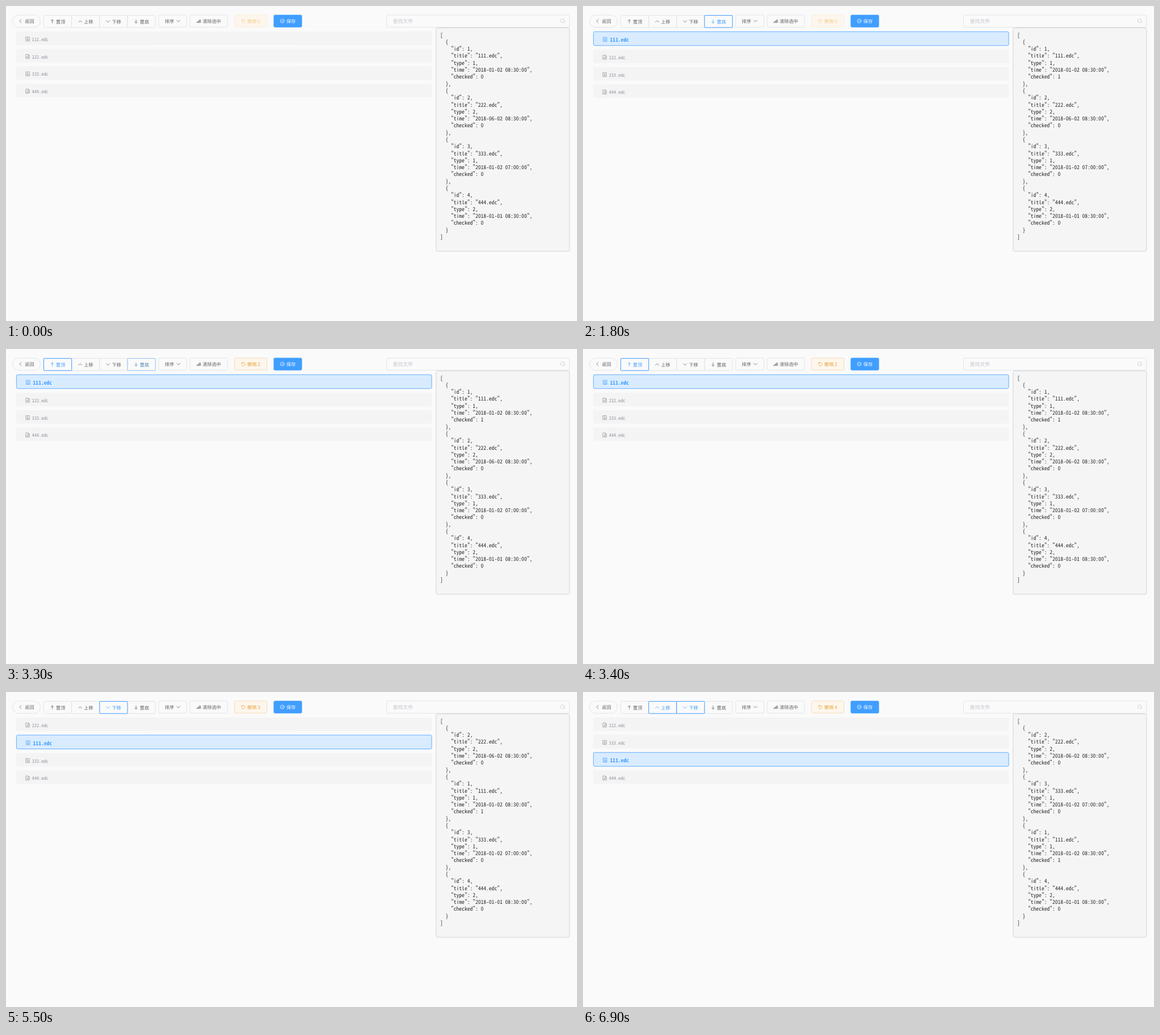
These frames come from a looping animation (1006 px wide and 556 px high, 8000 ms). An HTML page:

```html
<!DOCTYPE html>
<html lang="zh">
<head>
<meta charset="utf-8">
<title>文件排序</title>
<style>
  html, body { margin: 0; width: 100%; height: 100%; overflow: hidden; background: #fafafa; }
  svg { display: block; }
  text { font: 8.2px "Noto Sans CJK SC", "Noto Sans CJK", sans-serif; fill: currentColor; text-rendering: geometricPrecision; white-space: pre; }
  .icon { fill: none; stroke: currentColor; stroke-width: .75; stroke-linecap: round; stroke-linejoin: round; }
  .frame { stroke-width: .8; }
  .btn { color: #606266; }
  .btn .frame { fill: #fafafa; stroke: #dcdfe6; }
  .hot { color: #409eff; }
  .hot .frame { stroke: #409eff; stroke-width: 1; }
  .warn { color: #e6a23c; }
  .warn .frame { fill: #fdf6ec; stroke: #f5dab1; }
  .warn.off { color: #f3cc90; }
  .warn.off .frame { stroke: #faecd8; }
  .primary { color: #fff; }
  .primary .frame { fill: #409eff; stroke: #409eff; }
  .search { color: #c0c4cc; }
  .search text { font-size: 8.9px; }
  .row { color: #909399; }
  .row .frame { fill: #f4f4f5; }
  .row.on { color: #409eff; }
  .row.on .frame { fill: #d9ecff; stroke: #409eff; }
  .row text, #json text { font-family: "Noto Sans Mono CJK SC", "Noto Sans Mono CJK JP", "Noto Sans Mono", monospace; }
  .row.on text { font-size: 9.56px; font-weight: bold; }
  #json { color: #2a2a2a; }
  #json text { font-size: 9.56px; }
</style>
</head>
<body>
<svg width="1006" height="556" viewBox="0 0 1006 556">
  <g id="bar"></g>
  <g id="hot"></g>
  <g id="undo"></g>
  <g id="rows"></g>
  <rect x="757.8" y="38.6" width="235" height="394.3" rx="2.5" fill="#f5f5f5" stroke="#ccc" stroke-width=".8"/>
  <g id="json"></g>
</svg>
<script>
const LOOP = 8000;
const $ = id => document.getElementById(id);

// Icons are drawn around their own centre
const icons = {
  left: 'M1.6-3L-1.6 0L1.6 3',
  up: 'M-3 1.5L0-1.5L3 1.5',
  down: 'M-3-1.5L0 1.5L3-1.5',
  arrowUp: 'M0 3V-3M-2.4-.8L0-3L2.4-.8',
  arrowDown: 'M0-3V3M-2.4 .8L0 3L2.4 .8',
  brush: 'M-3.6 2.4H3.4V-.4L-.2 .2L-3.6 2.4M-.6 0L2-2.8L3.2-1.8L1.6 0M-.6 2.2L.4 .8M1.4 2.2V1',
  undo: 'M-2.8-2.8V-1H-1M-2.6-1.2A3 3 0 1 1-2.7 1.4',
  check: 'M3.4 0A3.4 3.4 0 1 1-3.4 0A3.4 3.4 0 1 1 3.4 0M-1.7 0L-.4 1.3L1.8-1.2',
  search: 'M3 0A3.3 3.3 0 1 1-3.6 0A3.3 3.3 0 1 1 3 0M2 2.4L3.6 4',
  tickets: 'M-3-3.6H3V3.6H-3ZM-1.5-1.6H.2M-1.5 .2H1.5M-1.5 1.9H1.5',
  doc: 'M-3-3.6H1L3-1.6V3.6H-3ZM1-3.6V-1.6H3M-1.5 .2H1.5M-1.5 1.9H1.5'
};

const icon = (name, x, y) => `<path class="icon" transform="translate(${x} ${y})" d="${icons[name]}"/>`;
const label = (s, x, y) => `<text x="${x}" y="${y}">${s}</text>`;
const frame = (x, y, w, h, r) => `<rect class="frame" x="${x}" y="${y}" width="${w}" height="${h}" rx="${r}"/>`;
const group = (cls, body, alpha = 1) => `<g class="${cls}" opacity="${alpha}">${body}</g>`;

const moves = [['置顶', 'arrowUp'], ['上移', 'up'], ['下移', 'down'], ['置底', 'arrowDown']];
const TOP = 0, UP = 1, DOWN = 2, BOTTOM = 3;

function moveButton(i, hot, alpha) {
  const [name, glyph] = moves[i], x = 66.5 + i * 49.2;
  const r = !hot && (i === TOP || i === BOTTOM) ? 2 : 0.5;
  const body = frame(x, 16.6, 49.2, 21.4, r) + icon(glyph, x + 15, 27.2) + label(name, x + 21.6, 30.6);
  return group(hot ? 'btn hot' : 'btn', body, alpha);
}

$('bar').innerHTML =
  group('btn', frame(11.6, 16, 48.9, 21.6, 10.8) + icon('left', 25.4, 26.6) + label('返回', 33.2, 30)) +
  moves.map((_, i) => moveButton(i)).join('') +
  group('btn', frame(269, 15.9, 49.6, 21.4, 2) + label('排序', 279.8, 29.8) + icon('down', 303.8, 26.6)) +
  group('btn', frame(324.2, 15.9, 66, 21.4, 2) + icon('brush', 339.6, 26.6) + label('清除选中', 346.3, 29.8)) +
  group('primary', frame(471.9, 15.9, 49.2, 21.4, 2) + icon('check', 486.8, 26.5) + label('保存', 494, 29.8)) +
  group('btn search', frame(670.5, 16, 322.3, 21.4, 2.5) + label('查找文件', 681.6, 30.2) + icon('search', 981, 26));

const files = {
  1: { type: 1, time: '2018-01-02 08:30:00' },
  2: { type: 2, time: '2018-06-02 08:30:00' },
  3: { type: 1, time: '2018-01-02 07:00:00' },
  4: { type: 2, time: '2018-01-01 08:30:00' }
};
const title = id => `${id}${id}${id}.edc`;

// Each step keeps what it does not mention; hot maps a button to its strength
const steps = [
  { t: 0, order: '1234', picked: 0, undo: 0, lit: 0, hot: {} },
  { t: 500, picked: 1 },
  { t: 1700, hot: { [DOWN]: 1 } },
  { t: 1800, hot: { [BOTTOM]: 1 } },
  { t: 2100, order: '2341', undo: 1, lit: .5 },
  { t: 2200, lit: 1 },
  { t: 2700, hot: { [BOTTOM]: 1, [DOWN]: 1 } },
  { t: 2800, hot: { [BOTTOM]: 1, [UP]: 1 } },
  { t: 2900, hot: { [BOTTOM]: 1, [TOP]: .5 } },
  { t: 3000, hot: { [BOTTOM]: 1, [TOP]: 1 } },
  { t: 3300, order: '1234', undo: 2, hot: { [BOTTOM]: .5, [TOP]: 1 } },
  { t: 3400, hot: { [TOP]: 1 } },
  { t: 4100, hot: { [TOP]: 1, [UP]: .5 } },
  { t: 4200, hot: { [TOP]: 1, [UP]: 1 } },
  { t: 4400, hot: { [TOP]: 1, [DOWN]: 1 } },
  { t: 4700, hot: { [TOP]: .5, [DOWN]: 1 } },
  { t: 4800, hot: { [DOWN]: 1 } },
  { t: 4900, order: '2134', undo: 3 },
  { t: 5600, order: '2314', undo: 4 },
  { t: 6800, hot: { [DOWN]: 1, [UP]: .5 } },
  { t: 6900, hot: { [DOWN]: 1, [UP]: 1 } }
];
for (let i = 1; i < steps.length; i++) steps[i] = { ...steps[i - 1], ...steps[i] };

function drawRows({ order, picked }) {
  let y = 44.9;
  return [...order].map(id => {
    const on = +id === picked, h = on ? 25.3 : 23.9;
    const inset = on ? .4 : 0;
    const body = frame(18 + inset, y + inset, 732.4 - 2 * inset, h - 2 * inset, 2.5) +
      icon(files[id].type === 1 ? 'tickets' : 'doc', on ? 39 : 38.3, y + (on ? 14 : 13.4)) +
      label(title(id), on ? 47.6 : 45.8, y + (on ? 17.9 : 16.9));
    y += h + 6.8;
    return group(on ? 'row on' : 'row', body);
  }).join('');
}

function drawJson({ order, picked }) {
  const data = [...order].map(id => ({
    id: +id, title: title(id), type: files[id].type, time: files[id].time, checked: +(+id === picked)
  }));
  return JSON.stringify(data, null, 2).split('\n').map((line, i) => {
    const text = line.trimStart(), indent = line.length - text.length;
    return label(text, 764.9 + indent * 4.78, 54.6 + i * 12.29);
  }).join('');
}

function drawUndo({ undo, lit }) {
  const body = frame(402.8, 15.9, 56.8, 21.4, 2) + icon('undo', 418, 26.6) + label('撤销 ' + undo, 425, 29.8);
  return group('warn off', body) + (lit ? group('warn', body, lit) : '');
}

let shown;
function tick(now) {
  const t = now % LOOP;
  const step = steps.findLast(s => s.t <= t);
  if (step !== shown) {
    shown = step;
    $('hot').innerHTML = Object.entries(step.hot).map(([i, a]) => moveButton(+i, true, a)).join('');
    $('undo').innerHTML = drawUndo(step);
    $('rows').innerHTML = drawRows(step);
    $('json').innerHTML = drawJson(step);
  }
}

const start = performance.now();
function loop() {
  tick(performance.now() - start);
  requestAnimationFrame(loop);
}
loop();
</script>
</body>
</html>
```
